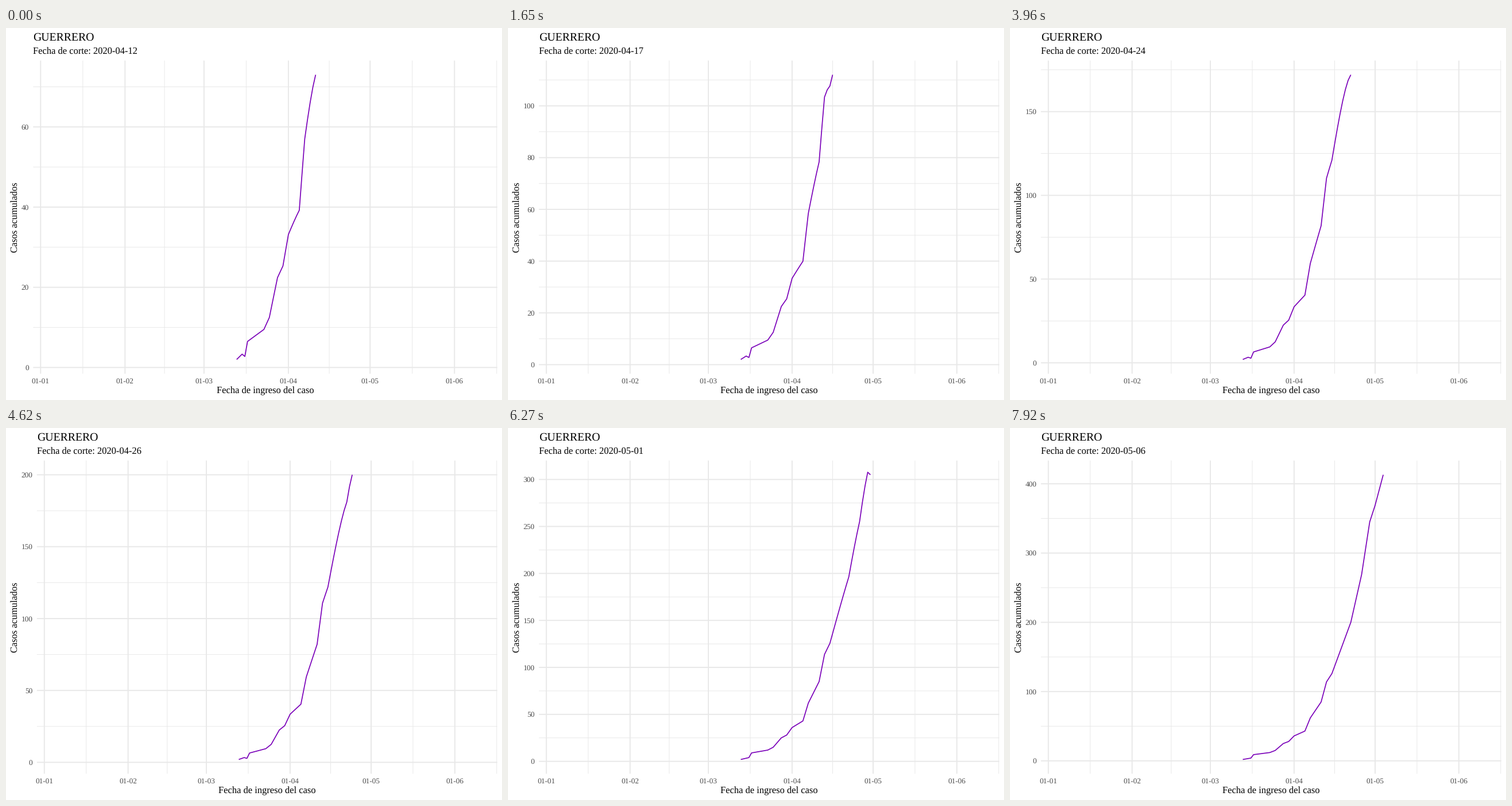
These frames come from a looping animation (864x648 px, 8000 ms). A matplotlib script:

```python
import numpy as np
import matplotlib.pyplot as plt
from matplotlib.animation import FuncAnimation
from matplotlib.collections import LineCollection

W, H, DPI = 864, 648, 100
LOOP, HOLD, TICK = 8000, 330, 20
STEPS = LOOP // HOLD
PT = 72 / DPI                      # points per pixel

# Panel edges in pixels; the left edge depends on the label width
TOP, BOTTOM, RIGHT = 56.7, 602.2, 855.75
PAD_DAYS, SPAN_DAYS = 2.74, 170.45

MONTH_STARTS = np.cumsum([0, 31, 29, 31, 30, 31])
MONTH_MIDS = MONTH_STARTS + np.diff(MONTH_STARTS, append=183) / 2

# Bends of the complete curve: day of the year, cumulative cases
FIRST_DAY = 72
BENDS = np.array([(72, 2), (75, 4), (76, 9), (82, 12), (84, 15), (87, 25),
                  (89, 28), (91, 36), (95, 43), (97, 62), (101, 85),
                  (103, 114), (105, 126), (112, 200), (116, 269),
                  (119, 345), (121, 369), (124, 413)])

# Cutoffs between which the end of the curve moves evenly: step, day, cases
ENDS = np.array([(0, 101, 73), (5, 106, 112), (6, 106, 112), (9, 109, 130),
                 (14, 114, 200), (17, 118, 268), (21, 122, 342),
                 (24, 124, 413)])


def curve_at(step):
    """The complete curve, less the cases not yet reported at this cutoff."""
    end = round(np.interp(step, ENDS[:, 0], ENDS[:, 1]))
    peak = np.interp(step, ENDS[:, 0], ENDS[:, 2])
    days = np.arange(FIRST_DAY, end + 1)
    backlog = np.interp(step, [14, 17], [2.5, 0])
    cases = np.interp(days, *BENDS.T) - backlog * np.clip((days - 74) / 2, 0, 1)
    cases -= (cases[-1] - peak) * np.exp((days - end) / 3)
    return days, cases


def tick_gap(low, high):
    """Round tick spacing for about five intervals."""
    cell = (high - low) / 5
    return 20 if cell < 28 else 50 if cell < 70 else 100


def cut_date(step):
    day = 12 + step
    return f"2020-04-{day:02d}" if day <= 30 else f"2020-05-{day - 30:02d}"


plt.rcParams["font.family"] = "Liberation Serif"
plt.rcParams["text.hinting"] = "none"
fig = plt.figure(figsize=(W / DPI, H / DPI), dpi=DPI, facecolor="white")
ax = fig.add_axes([0, 0, 1, 1])
ax.set_xlim(0, W)
ax.set_ylim(H, 0)
ax.axis("off")


def grid(width, z):
    lines = LineCollection([], colors="#e8e8e8", linewidths=width * PT, zorder=z)
    lines.set_snap(False)
    return ax.add_collection(lines, autolim=False)


def label(x, y, text, px, color="black", **kw):
    return ax.text(x, y, text, fontsize=px * PT, color=color,
                   va="baseline", **kw)


def tick_label(y, text, ha):
    return label(0, y, text, 13.2, "#4d4d4d", ha=ha)


minor, major = grid(0.95, 1), grid(1.9, 2)
line, = ax.plot([], [], color="#7a00b9", lw=1.7 * PT, zorder=3,
                solid_capstyle="butt", solid_joinstyle="round", snap=False)

title = label(0, 22, "GUERRERO", 19.8)
subtitle = label(0, 45.6, "", 16.5)
x_title = label(0, 636.6, "Fecha de ingreso del caso", 16.5, ha="center")
label(19.6, (TOP + BOTTOM) / 2, "Casos acumulados", 16.5, ha="center",
      rotation=90, rotation_mode="anchor")
x_labels = [tick_label(618.6, f"01-{m:02d}", "center") for m in range(1, 7)]
y_labels = [tick_label(0, "", "right") for _ in range(8)]


def draw(i):
    step = min((i * TICK + TICK // 2) // HOLD, STEPS)
    days, cases = curve_at(step)
    pad = 0.05 * (cases[-1] - cases[0])
    low, high = cases[0] - pad, cases[-1] + pad
    left = 47.3 if high < 100 else 53.9

    def px(day):
        return left + (day + PAD_DAYS) * (RIGHT - left) / SPAN_DAYS

    def py(value):
        return BOTTOM - (value - low) / (high - low) * (BOTTOM - TOP)

    def rules(xs, ys):
        return ([[(px(x), TOP), (px(x), BOTTOM)] for x in xs]
                + [[(left, py(y)), (RIGHT, py(y))] for y in ys])

    gap = tick_gap(low, high)
    ticks = np.arange(0, high, gap)
    minor.set_segments(rules(MONTH_MIDS, np.arange(gap / 2, high, gap)))
    major.set_segments(rules(MONTH_STARTS, ticks))
    line.set_data(px(days), py(cases))

    subtitle.set_text(f"Fecha de corte: {cut_date(step)}")
    title.set_x(left)
    subtitle.set_x(left)
    x_title.set_x((left + RIGHT) / 2)
    for text, day in zip(x_labels, MONTH_STARTS):
        text.set_x(px(day))
    for text in y_labels:
        text.set_text("")
    for text, tick in zip(y_labels, ticks):
        text.set_text(f"{tick:.0f}")
        text.set_position((left - 7.3, py(tick) + 4.5))
    return []


anim = FuncAnimation(fig, draw, frames=LOOP // TICK, interval=TICK,
                     init_func=lambda: draw(0), repeat=True, repeat_delay=0)
plt.show()
```
